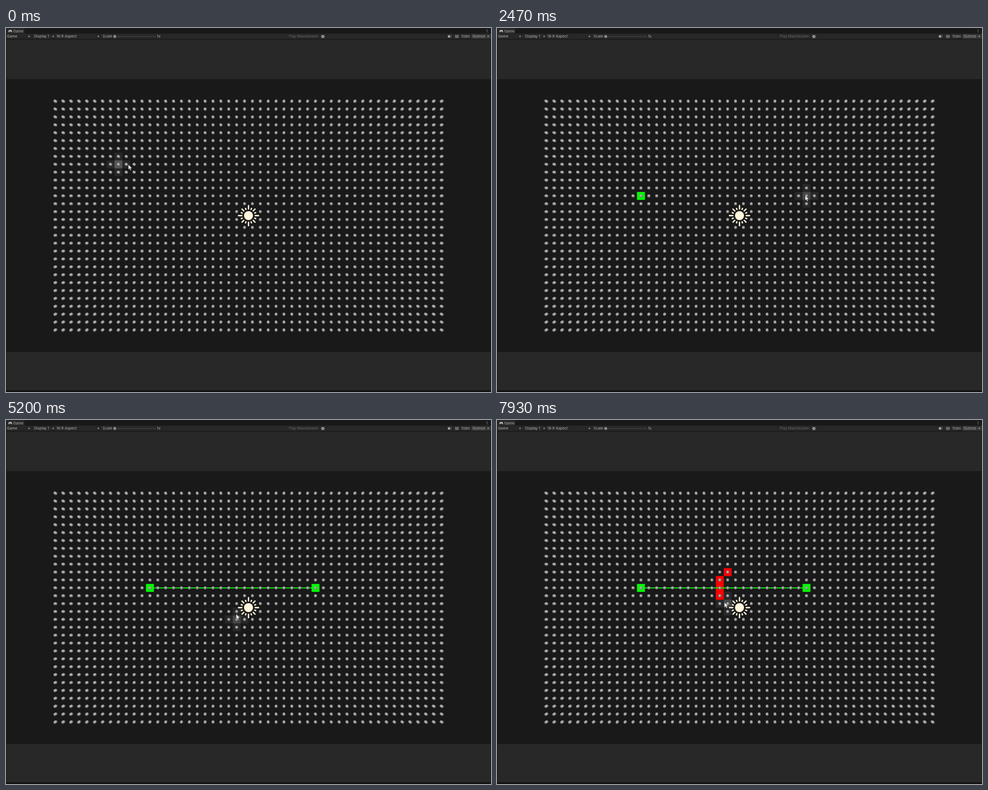
Write an HTML page that moves like this. It is 864x648 px and loops after 8000 ms.

```html
<!DOCTYPE html>
<html lang="en">
<head>
<meta charset="utf-8">
<title>Grid painting</title>
<style>
  html, body { margin: 0; width: 100%; height: 100%; overflow: hidden; background: #191919; }
  svg { display: block; width: 864px; height: 648px; }
  text { font: 6.5px Inter, "Open Sans", sans-serif; fill: #b6b6b6; }
  .dim { fill: #686868; }
</style>
</head>
<body>
<svg id="stage" viewBox="0 0 864 648">
  <!-- window chrome -->
  <rect width="864" height="648" fill="#191919"/>
  <rect width="33" height="10" fill="#272727"/>
  <rect y="10" width="864" height="10" fill="#272727"/>
  <rect y="19.5" width="864" height="1.5" fill="#1b1b1b"/>
  <rect x="1" y="21" width="862" height="70" fill="#282828"/>
  <rect x="1" y="577" width="862" height="68" fill="#282828"/>
  <rect y="645.5" width="864" height="2.5" fill="#121011"/>
  <rect x="829" y="10.5" width="35" height="9" fill="#343434"/>

  <g fill="#b6b6b6">
    <path d="M5 3.5h5l1 4h-1.6l-1-1.2h-1.8l-1 1.2H4z"/>
    <path d="M857 2.5v6" stroke="#b6b6b6" stroke-width="1.1" stroke-dasharray="1.1 .9"/>
    <path d="M787 13.4h1.6l2-1.7v6.4l-2-1.7H787z"/>
    <path d="M792 13q1.6 1.9 0 3.8" fill="none" stroke="#b6b6b6" stroke-width=".8"/>
    <rect x="800" y="12.5" width="6.5" height="5" rx=".6" fill="#777"/>
    <path d="M801 14h4.6M801 15.7h4.6" stroke="#303030" stroke-width=".6" stroke-dasharray=".8 .4"/>
    <ellipse cx="564.5" cy="15.2" rx="1.9" ry="2.7"/>
    <path d="M561.5 12.5l6 5.4M567.5 12.5l-6 5.4M561 15.2h7" stroke="#b6b6b6" stroke-width=".8"/>
    <path d="M563.5 14.5h2M563.5 16h2" stroke="#333" stroke-width=".6"/>
    <rect x="194" y="14.6" width="73" height=".9" fill="#4c4c4c"/>
    <circle cx="193.7" cy="15" r="2.6" fill="#8e8e8e"/>
  </g>
  <g id="labels">
    <text x="13" y="7.7">Game</text>
    <text x="2" y="17.3" data-arrow="41">Game</text>
    <text x="50" y="17.3" data-arrow="84">Display 1</text>
    <text x="90" y="17.3" data-arrow="164.5">16:9 Aspect</text>
    <text x="172" y="17.3">Scale</text>
    <text x="269" y="17.3">1x</text>
    <text x="504" y="17.3" data-arrow="554" class="dim">Play Maximized</text>
    <text x="811" y="17.3">Stats</text>
    <text x="831" y="17.3" data-arrow="859">Gizmos</text>
  </g>

  <!-- game view -->
  <g fill="#fff">
    <rect id="core"/>
    <g id="arms" fill-opacity=".065"></g>
  </g>
  <g id="marks"></g>
  <path id="link" stroke="#0f0" stroke-width="1.7"/>
  <g id="dots"></g>
  <g id="sun" transform="translate(432 334)"></g>
  <path id="cursor" d="M0 0V9.2L2.1 7.3L3.6 10.6L5.2 9.9L3.8 6.7H6.7Z" fill="#fff" stroke="#222" stroke-width=".6"/>
</svg>

<script>
const LOOP = 8000, STEP = 1000 / 15;
const COLS = 50, ROWS = 30, PITCH = 14.045, CX = 432, CY = 334, FOCAL = 421;

const $ = id => document.getElementById(id);
const gridX = col => CX + (col - (COLS - 1) / 2) * PITCH;
const gridY = row => CY + (row - (ROWS - 1) / 2) * PITCH;

function set(el, attrs) {
  for (const name in attrs) el.setAttribute(name, attrs[name]);
  return el;
}

function add(parent, tag, attrs = {}) {
  return parent.appendChild(set(document.createElementNS("http://www.w3.org/2000/svg", tag), attrs));
}

function cellBox(col, row) {
  return { x: gridX(col) - PITCH / 2, y: gridY(row) - PITCH / 2, width: PITCH, height: PITCH };
}

for (const label of document.querySelectorAll("[data-arrow]")) {
  add($("labels"), "path", {
    d: `M${label.dataset.arrow - 1.8} 14h3.6l-1.8 2.2z`,
    fill: getComputedStyle(label).fill
  });
}

// spheres stretch away from the centre, as under a wide lens
function ball(x, y, r, fill) {
  const dx = x - CX, dy = y - CY;
  const stretch = Math.hypot(1, Math.hypot(dx, dy) / FOCAL);
  const turn = Math.atan2(dy, dx) * 180 / Math.PI;
  add($("dots"), "ellipse", {
    rx: r * stretch, ry: r, fill, transform: `translate(${x} ${y}) rotate(${turn})`
  });
}
for (let row = 0; row < ROWS; row++) {
  for (let col = 0; col < COLS; col++) {
    ball(gridX(col), gridY(row), 2.75, "#6f6d6f");
    ball(gridX(col) - 0.2, gridY(row) - 0.35, 2, "#aeacae");
  }
}

// light icon: dark outline first, then the pale shape
function drawSun(fill, grow) {
  for (let i = 0; i < 16; i++) {
    const end = i % 4 === 0 ? 19 : i % 2 === 0 ? 17.6 : 15;
    const half = 1.2 + grow;
    add($("sun"), "rect", {
      x: 10.8 - grow, y: -half, width: end - 10.8 + 2 * grow, height: 2 * half, rx: 1, fill,
      transform: `rotate(${i * 22.5})`
    });
  }
  add($("sun"), "circle", { r: 8 + 4 * grow, fill });
}
drawSun("#191919", 0.9);
drawSun("#fff6dc", 0);

// painted cells appear at a given step
const marks = [];
function mark(from, col, row, fill) {
  marks.push({ from, el: add($("marks"), "rect", { ...cellBox(col, row), fill }) });
}
mark(22, 12, 12, "#0f0");
mark(49, 33, 12, "#0f0");
mark(89, 22, 13, "#f00");
mark(96, 22, 12, "#f00");
mark(102, 22, 11, "#f00");
mark(109, 23, 10, "#f00");
marks.push({ from: 49, el: set($("link"), { d: `M${gridX(12)} ${gridY(12)}H${gridX(33)}` }) });

// pointer strokes: first step, last step, then evenly timed stops
const home = [202, 243];
const strokes = [
  [-1, 0, [218, 243]],
  [0, 5, [268, 248], [338, 252], [405, 255], [449, 257], [452, 257]],
  [7, 17, [399, 255], [365, 258], [300, 274], [266, 292], [255, 298]],
  [20, 24, [256, 298]],
  [28, 36, [310, 298], [415, 298], [505, 298], [549, 298]],
  [53, 60, [520, 362], [487.5, 421.5]],
  [72, 82, [414, 352], [394, 319]],
  [84, 86, [394, 315]],
  [89, 94, [399, 298]],
  [96, 99, [398, 284]],
  [102, 106, [411, 271]],
  [110, 116, [410, 305], [407, 338]],
  [116, 118, [405, 324.5]]
];

function pointer(k) {
  let at = home;
  for (const [from, to, ...stops] of strokes) {
    if (k <= from) break;
    const p = Math.min(1, (k - from) / (to - from)) * stops.length;
    const i = Math.min(Math.floor(p), stops.length - 1);
    const a = i ? stops[i - 1] : at, b = stops[i];
    at = a.map((v, n) => v + (b[n] - v) * (p - i));
  }
  return at;
}

const sides = [[0, -1], [-1, 0], [1, 0], [0, 1]];
const arms = sides.map(() => add($("arms"), "rect"));

function draw(time) {
  const k = Math.floor((time % LOOP) / STEP + 0.06) % 120;
  set($("cursor"), { transform: `translate(${pointer(k).join(" ")})` });

  // the hovered cell trails the pointer by one step
  const [x, y] = pointer(k - 1);
  const col = Math.round((x - gridX(0)) / PITCH), row = Math.round((y - gridY(0)) / PITCH);
  set($("core"), { ...cellBox(col, row), "fill-opacity": k < 29 ? 0.27 : 0.2 });
  sides.forEach(([dx, dy], i) => set(arms[i], cellBox(col + dx, row + dy)));

  for (const { from, el } of marks) el.style.display = k >= from ? "" : "none";
}

const start = performance.now();
function tick() {
  draw(performance.now() - start);
  requestAnimationFrame(tick);
}
tick();
</script>
</body>
</html>
```
